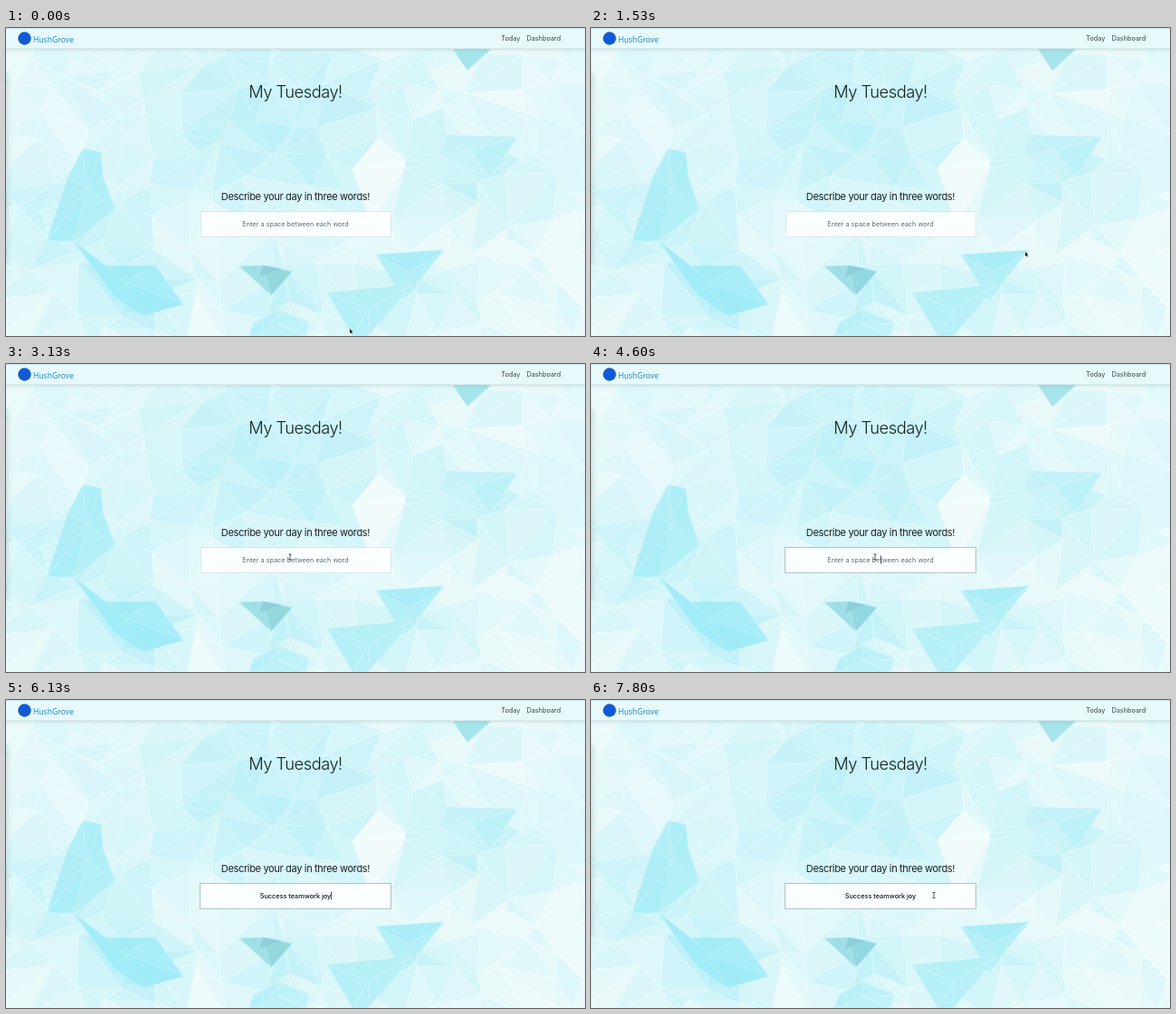
Animation of 640 by 340 pixels, one loop 8 s. Source, as an HTML page with a canvas:

```html
<!DOCTYPE html>
<html lang="en">
<head>
<meta charset="utf-8">
<title>My Tuesday</title>
<style>
  html, body { margin: 0; width: 100%; height: 100%; overflow: hidden; background: #dff7f9; }
  #stage { position: absolute; left: 0; top: 0; width: 640px; height: 340px; overflow: hidden;
    font: 400 7.3px/20px Inter, "Open Sans", sans-serif; color: #1c2022; }
  #stage > * { position: absolute; white-space: nowrap; }
  canvas { left: 0; top: 0; width: 640px; height: 340px; }
  .brand { left: 30px; top: 2.6px; font: 400 8.6px/20px "Open Sans", "Noto Sans", sans-serif; color: #1684c4; }
  .nav { top: 2.4px; color: #3c4648; }
  .mid { left: 0; width: 640px; text-align: center; }
  h1 { margin: 0; top: 60px; font-weight: 300; font-size: 18.3px; letter-spacing: -.5px; }
  .ask { top: 175.5px; font-size: 11px; letter-spacing: -.33px; }
  #box { left: 215px; top: 202px; width: 211px; height: 29px; box-sizing: border-box;
    background: rgba(255, 255, 255, .84); border: 1px solid #dbe9ea; }
  #box.focus { left: 214px; width: 212px; border-color: #b3c3c5; }
  #entry { top: 206.7px; color: #626b6e; }
  #entry.typed { color: #101416; font-weight: 500; }
</style>
</head>
<body>
<div id="stage">
  <canvas id="back"></canvas>
  <span class="brand">HushGrove</span>
  <span class="nav" style="left:547.3px">Today</span>
  <span class="nav" style="left:575.5px">Dashboard</span>
  <h1 class="mid">My Tuesday!</h1>
  <span class="mid ask">Describe your day in three words!</span>
  <div id="box"></div>
  <span class="mid" id="entry">Enter a space between each word</span>
  <canvas id="front"></canvas>
</div>
<script>
const W = 640, H = 340, LOOP = 8000;
const box = document.getElementById('box');
const entry = document.getElementById('entry');

function layer(id) {
  const c = document.getElementById(id), r = window.devicePixelRatio || 1;
  c.width = W * r;
  c.height = H * r;
  const g = c.getContext('2d');
  g.scale(r, r);
  return g;
}
const back = layer('back'), front = layer('front');

let seed = 11;
function rand() {
  seed = (seed * 16807) % 2147483647;
  return seed / 2147483647;
}
const spread = n => (rand() - .5) * 2 * n;

const glow = (x, y, cx, cy, rx, ry) => Math.exp(-(((x - cx) / rx) ** 2) - ((y - cy) / ry) ** 2);

// How blue the paper is at a point
function toneAt(x, y) {
  return .14
    + .42 * glow(x, y, 290, 105, 150, 100)
    + .3 * glow(x, y, 70, 220, 80, 70)
    + .5 * glow(x, y, 140, 295, 55, 40)
    + .32 * glow(x, y, 300, 295, 45, 40)
    + .3 * glow(x, y, 525, 165, 80, 45)
    + .3 * glow(x, y, 445, 295, 90, 32)
    - .35 * glow(x, y, 415, 160, 25, 45);
}

function shade(t) {
  const k = Math.max(0, Math.min(1.1, t));
  const mix = (a, b) => Math.round(a + (b - a) * k);
  return `rgb(${mix(242, 158)},${mix(251, 235)},${mix(251, 246)})`;
}

function trace(g, pts) {
  g.beginPath();
  pts.forEach(p => g.lineTo(p[0], p[1]));
  g.closePath();
}

function fill(color, ...pts) {
  trace(back, pts);
  back.fillStyle = back.strokeStyle = color;
  back.fill();
  back.lineWidth = .5;
  back.stroke();
  back.strokeStyle = 'rgba(255,255,255,.32)';
  back.lineWidth = .6;
  back.stroke();
}

// A polygon split into a fan of slightly different triangles
function facet(tone, ...pts) {
  const mean = i => pts.reduce((s, p) => s + p[i], 0) / pts.length + spread(5);
  const hub = [mean(0), mean(1)];
  pts.forEach((p, i) => fill(shade(tone + spread(.08)), p, pts[(i + 1) % pts.length], hub));
}

function mesh() {
  const sx = 40, sy = 34;
  const rows = Array.from({ length: 13 }, (_, j) => Array.from({ length: 19 }, (_, i) =>
    [(i - 1) * sx + spread(17), (j - 1) * sy + spread(15)]));
  const tri = (a, b, c) => {
    const tone = toneAt((a[0] + b[0] + c[0]) / 3, (a[1] + b[1] + c[1]) / 3);
    fill(shade(tone + spread(.11)), a, b, c);
  };
  for (let j = 0; j < rows.length - 1; j++) {
    for (let i = 0; i < rows[j].length - 1; i++) {
      const a = rows[j][i], b = rows[j][i + 1], c = rows[j + 1][i + 1], d = rows[j + 1][i];
      if (rand() < .5) { tri(a, b, c); tri(a, c, d); }
      else { tri(a, b, d); tri(b, c, d); }
    }
  }
}

function shadow(x, y, w, h, dx, dy, alpha) {
  const g = back.createLinearGradient(x, y, x + dx, y + dy);
  [1, .3, 0].forEach((k, i) => g.addColorStop(i / 2, `rgba(70,105,110,${alpha * k})`));
  back.fillStyle = g;
  back.fillRect(x, y, w, h);
}

function drawBack() {
  mesh();
  facet(.82, [85, 133], [105, 137], [107, 163], [120, 200], [75, 235], [45, 235], [68, 165]);
  facet(.9, [75, 235], [110, 262], [165, 262], [196, 305], [150, 318], [118, 295]);
  facet(.55, [478, 140], [487, 118], [565, 120], [535, 165]);
  facet(.8, [409, 250], [484, 245], [440, 300]);
  facet(.68, [355, 292], [450, 283], [400, 340], [383, 340]);
  facet(.65, [275, 325], [300, 311], [335, 325], [332, 340], [268, 340]);
  // darker accents
  const tip = [293, 295], ridge = [284, 262];
  fill('#9fe0e7', [258, 263], ridge, tip);
  fill('#93d7df', ridge, [316, 269], tip);
  fill('#8cd1d9', ridge, [306, 266], [279, 276]);
  fill('#a6e4eb', [494, 23], [536, 23], [510, 47]);

  // side shadow, fading at both ends
  for (let y = 40; y < 270; y++) {
    shadow(0, y, 8, 1, 8, 0, .16 * Math.min(1, (y - 40) / 18, (270 - y) / 18));
  }
  // header
  back.fillStyle = '#e7f9fb';
  back.fillRect(0, 0, W, 23);
  shadow(0, 0, W, 1, 0, 2, .2);
  shadow(0, 22.5, W, 5, 0, 5, .18);
  back.fillStyle = '#1159d6';
  back.beginPath();
  back.arc(20.5, 11.5, 7.2, 0, Math.PI * 2);
  back.fill();
}

// Pointer moves: start, end, x, y
const moves = [
  [930, 1530, 480, 247], [1530, 1670, 487, 230], [1810, 2130, 417, 65],
  [2340, 2670, 337, 188], [2810, 3130, 314, 213], [6470, 6720, 379, 215.5]
];

function pointerAt(t) {
  let x = 380, y = 332;
  for (const [t0, t1, x1, y1] of moves) {
    const k = Math.max(0, Math.min(1, (t - t0) / (t1 - t0)));
    const e = k * k * (3 - 2 * k);
    x += (x1 - x) * e;
    y += (y1 - y) * e;
  }
  return [x, y];
}

function arrow(x, y) {
  const tail = [[0, 0], [0, 5], [1.2, 4], [2, 5.7], [2.8, 5.3], [2, 3.7], [3.5, 3.5]];
  trace(front, tail.map(p => [x + p[0], y + p[1]]));
  front.strokeStyle = '#fff';
  front.lineWidth = .8;
  front.stroke();
  front.fillStyle = '#111';
  front.fill();
}

function beam(x, y) {
  front.strokeStyle = '#2b3133';
  front.lineWidth = .8;
  front.beginPath();
  front.moveTo(x, y - 3);
  front.lineTo(x, y + 3);
  for (const s of [-3, 3]) {
    front.moveTo(x - 1.5, y + s);
    front.lineTo(x + 1.5, y + s);
  }
  front.stroke();
}

const within = (t, ...spans) => spans.some(([a, b]) => t >= a && t < b);

function draw(t) {
  const typed = t >= 5800;
  box.className = t >= 4600 ? 'focus' : '';
  entry.classList.toggle('typed', typed);
  const text = typed ? 'Success teamwork joy' : 'Enter a space between each word';
  if (entry.textContent !== text) entry.textContent = text;

  front.clearRect(0, 0, W, H);
  if (within(t, [4600, 5100], [5600, 6270], [6800, 7800])) {
    front.fillStyle = '#1c2022';
    front.fillRect(typed ? 359 : 320.2, 211.5, .8, 9);
  }
  if (within(t, [6070, 6500])) return;
  const [x, y] = pointerAt(t);
  const inBox = x > 215 && x < 425 && y > 202 && y < 230;
  (inBox ? beam : arrow)(x, y);
}

drawBack();
const start = performance.now();
function tick() {
  draw((performance.now() - start) % LOOP);
  requestAnimationFrame(tick);
}
tick();
</script>
</body>
</html>
```
